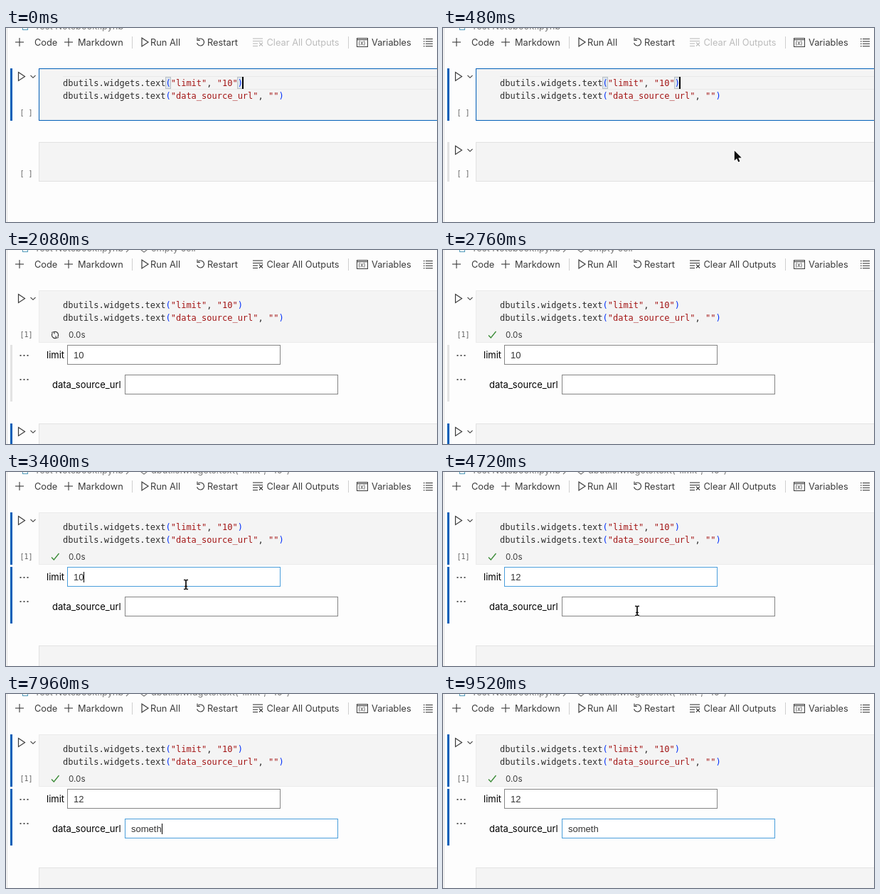
Animation of 606 by 274 pixels, one loop 9560 ms. Source, as an HTML page with a canvas:

```html
<!DOCTYPE html>
<html lang="en">
<head>
<meta charset="utf-8">
<title>Notebook widgets</title>
<style>
html, body { margin: 0; width: 100%; height: 100%; overflow: hidden; background: #fdfdfd; }
canvas { display: block; width: 606px; height: 274px; }
</style>
</head>
<body>
<canvas id="stage"></canvas>
<script>
const W = 606, H = 274, LOOP = 9560;
const UI = 'Inter, sans-serif', MONO = '"DejaVu Sans Mono", monospace', FIELD = '"Liberation Sans", sans-serif';
const BLUE = '#005fb8', INK = '#3b3b3b', FAINT = '#bcbcbc', PANEL = '#f4f4f4', EDGE = '#e2e2e2';

const canvas = document.getElementById('stage');
const ctx = canvas.getContext('2d');
const ratio = window.devicePixelRatio || 1;
canvas.width = W * ratio;
canvas.height = H * ratio;

// Moments of the session, in ms
const T = { clickCode: 840, run: 1840, output: 2000, done: 2360, clickLimit: 3120, clickUrl: 4760 };
const limitKeys = [[0, '10'], [3960, '1'], [4200, '12']];
const urlKeys = [[0, ''], [5640, 's'], [5840, 'so'], [6040, 'sok'], [6240, 'sokm'], [6400, 'sokme'],
  [6840, 'sokm'], [6960, 'sok'], [7080, 'so'], [7280, 'som'], [7440, 'some'], [7680, 'somet'], [7880, 'someth']];

// Each move: start, end, hide time, from, to
const moves = [
  [120, 760, T.run, [430, 284], [396, 98]],
  [2880, 3100, 3960, [508, 226], [253, 159]],
  [4400, 4680, 5640, [253, 159], [273, 196]]
];

const last = (keys, t) => keys.filter(k => k[0] <= t).pop();
const blinkOn = (t, since) => (t - since) % 1000 < 500;

function text(s, x, y, size, color, family = UI) {
  ctx.font = `${size}px ${family}`;
  ctx.fillStyle = color;
  ctx.fillText(s, x, y);
  return ctx.measureText(s).width;
}

function fill(x, y, w, h, color) {
  ctx.fillStyle = color;
  ctx.fillRect(x, y, w, h);
}

function box(x, y, w, h, bg, edge) {
  fill(x, y, w, h, bg);
  ctx.strokeStyle = edge;
  ctx.lineWidth = 1;
  ctx.strokeRect(x + 0.5, y + 0.5, w - 1, h - 1);
}

function path(points, color = INK, width = 1.1, close = false) {
  ctx.beginPath();
  points.forEach(([x, y]) => ctx.lineTo(x, y));
  if (close) ctx.closePath();
  ctx.strokeStyle = color;
  ctx.lineWidth = width;
  ctx.stroke();
}

function arc(x, y, r, a, b, color = INK, width = 1.2) {
  ctx.beginPath();
  ctx.arc(x, y, r, a, b);
  ctx.strokeStyle = color;
  ctx.lineWidth = width;
  ctx.stroke();
}

function plus(x, y) {
  path([[x - 6, y], [x + 6, y]]);
  path([[x, y - 6], [x, y + 6]]);
}

const play = (x, y, w, h) => path([[x, y - h / 2], [x + w, y], [x, y + h / 2]], INK, 1.2, true);

function breadcrumb(t) {
  const gray = '#777';
  box(23, -6, 8, 9, '#fdfdfd', '#519aba');
  text('Test Notebook.ipynb', 40, 2, 12.8, gray);
  if (t < T.run) return;
  path([[169, -5], [173, -1], [169, 3]], gray);
  path([[190, -3], [190, 0], [194, 3], [198, 0], [198, -3]], gray);
  text(t < T.clickLimit ? 'empty cell' : 'dbutils.widgets.text("limit", "10")', 204, 2, 12.8, gray);
}

function toolbar(t) {
  const label = (s, x, color = INK) => text(s, x, 25, 12.8, color);
  plus(19, 20);
  label('Code', 40);
  plus(88, 20);
  label('Markdown', 101);
  fill(177, 12, 1, 17, '#cfcfcf');
  play(191, 20, 9, 12);
  label('Run All', 203);

  arc(273.5, 20, 5, -2.3, 2.9);
  path([[269, 13.5], [269, 17.5], [273, 17.5]]);
  label('Restart', 283);

  const clear = t < T.run ? FAINT : INK;
  [[15, 14], [18.5, 14], [22, 7], [25.5, 7]].forEach(([y, w]) => path([[347, y], [347 + w, y]], clear));
  path([[356, 20.5], [361, 25.5]], clear);
  path([[361, 20.5], [356, 25.5]], clear);
  label('Clear All Outputs', 366.5, clear);
  fill(481, 12, 1, 17, '#cfcfcf');

  box(493, 14, 16, 13, '#fdfdfd', INK);
  path([[493, 16.5], [509, 16.5]]);
  text('(x)', 495.3, 24.3, 8, INK);
  label('Variables', 514);

  for (let i = 0; i < 4; i++) {
    const y = 15.5 + i * 3.4;
    fill(587, y - 0.6, 1.6, 1.2, INK);
    path([[590, y], [600, y]]);
  }
}

function runControls(y) {
  play(17.5, y, 9, 12);
  path([[34.5, y - 1.7], [38, y + 1.8], [41.5, y - 1.7]]);
}

function codeLine(name, value, y) {
  const parts = [['dbutils.widgets.text', '#2b2b2b'], ['(', '#0431fa'], [`"${name}"`, '#a31515'],
    [', ', '#2b2b2b'], [`"${value}"`, '#a31515'], [')', '#0431fa']];
  let x = 80;
  for (const [s, color] of parts) x += text(s, x, y, 12, color, MONO);
}

function editorFocus(t) {
  const second = t >= T.clickCode;
  const y = second ? 87 : 69;
  const end = 80 + (second ? 43 : 35) * 7.224;
  fill(80, y - 1, W - 80, 1, '#e9e9e9');
  fill(80, y + 17, W - 80, 1, '#e9e9e9');
  for (const x of [224, Math.round(end - 7.5)]) box(x, y, 8, 17, '#dfe6ec', '#b9c0c6');
  return () => {
    if (blinkOn(t, second ? T.clickCode : 0)) fill(Math.round(end) - 1, y, 2, 17, '#000');
  };
}

function spinner(t) {
  ctx.save();
  ctx.translate(69, 120);
  ctx.rotate((t - T.run) / 1500 * Math.PI * 2);
  for (let i = 0; i < 2; i++) {
    arc(0, 0, 4.6, 0.25, 2.75);
    path([[5.6, -2.2], [4.6, 1], [1.6, 0.2]]);
    ctx.rotate(Math.PI);
  }
  ctx.restore();
}

function codeCell(t) {
  const editing = t < T.run;
  box(46, 57, W - 45, 74, PANEL, editing ? BLUE : '#ebebeb');
  if (editing || t >= T.clickLimit) fill(6, 57, 3, 74, BLUE);
  runControls(68.5);
  const drawCaret = editing ? editorFocus(t) : null;
  codeLine('limit', '10', 82);
  codeLine('data_source_url', '', 100);
  if (drawCaret) drawCaret();
  text(t < T.output ? '[ ]' : '[1]', 19.5, 123, 10, '#616161', MONO);
  if (editing) return;
  if (t < T.done) spinner(t);
  else path([[64, 120.5], [67.3, 124], [74.5, 115]], '#388a34', 1.3);
  text('0.0s', 88, 124, 11.6, INK);
}

function field(x, y, value, focused, t, since) {
  box(x, y, 300, 28, '#fff', focused ? '#4a9edb' : '#858585');
  const w = text(value, x + 9, y + 19, 13, '#333', FIELD);
  if (focused && blinkOn(t, since)) fill(Math.round(x + 9 + w), y + 7, 1, 15, '#000');
}

function outputs(t) {
  fill(6, 134, 3, 80, t < T.clickLimit ? '#e3e3e3' : BLUE);
  for (const y of [149, 183]) for (let i = 0; i < 3; i++) fill(19.5 + i * 5, y - 1, 2, 2, '#555');
  const [limitAt, limit] = last(limitKeys, t);
  const [urlAt, url] = last(urlKeys, t);
  text('limit', 57, 153, 13, '#000');
  field(86, 134, limit, t >= T.clickLimit && t < T.clickUrl, t, Math.max(limitAt, T.clickLimit));
  text('data_source_url', 65, 195, 13, '#000');
  field(167, 176, url, t >= T.clickUrl, t, Math.max(urlAt, T.clickUrl));
}

function emptyCell(t, mouse) {
  const y = t < T.output ? 161 : 245;
  const selected = t >= T.run && t < T.clickLimit;
  const hover = mouse && mouse[1] > y && mouse[1] < y + 56;
  box(46, y, W - 45, 56, PANEL, EDGE);
  if (selected || hover) {
    fill(6, y, 3, 56, selected ? BLUE : EDGE);
    runControls(y + 11.5);
  }
  text('[ ]', 19.5, y + 48, 10, '#616161', MONO);
}

function mouseAt(t) {
  const move = moves.find(m => t >= m[0] && t < m[2]);
  if (!move) return null;
  const [start, end, , from, to] = move;
  const p = Math.min(1, (t - start) / (end - start));
  const k = p * p * (3 - 2 * p);
  return from.map((v, i) => v + (to[i] - v) * k);
}

function pointer([x, y], t) {
  const overText = (y > 57 && y < 131) || (t >= T.output && x < 467 && y > 134 && y < 204);
  ctx.save();
  ctx.translate(x, y);
  if (overText) {
    for (const [color, width] of [['#fff', 3], ['#111', 1.3]]) {
      path([[-3, -6.5], [-1, -6.5], [0, -5.5], [0, 5.5], [-1, 6.5], [-3, 6.5]], color, width);
      path([[3, -6.5], [1, -6.5], [0, -5.5], [0, 5.5], [1, 6.5], [3, 6.5]], color, width);
      path([[-2, 2.5], [2, 2.5]], color, width);
    }
  } else {
    path([[0, 0], [0, 14], [3.3, 11], [5.5, 16], [7.7, 15], [5.5, 10.2], [10, 10]], '#fff', 2, true);
    ctx.fillStyle = '#111';
    ctx.fill();
  }
  ctx.restore();
}

function draw(t) {
  ctx.setTransform(ratio, 0, 0, ratio, 0, 0);
  fill(0, 0, W, H, '#fdfdfd');
  fill(1, 0, 1, H, '#dedede');
  const mouse = mouseAt(t);
  breadcrumb(t);
  toolbar(t);
  codeCell(t);
  emptyCell(t, mouse);
  if (t >= T.output) outputs(t);
  if (mouse) pointer(mouse, t);
}

const begin = performance.now();
function frame() {
  draw((performance.now() - begin) % LOOP);
  requestAnimationFrame(frame);
}
frame();
</script>
</body>
</html>
```
